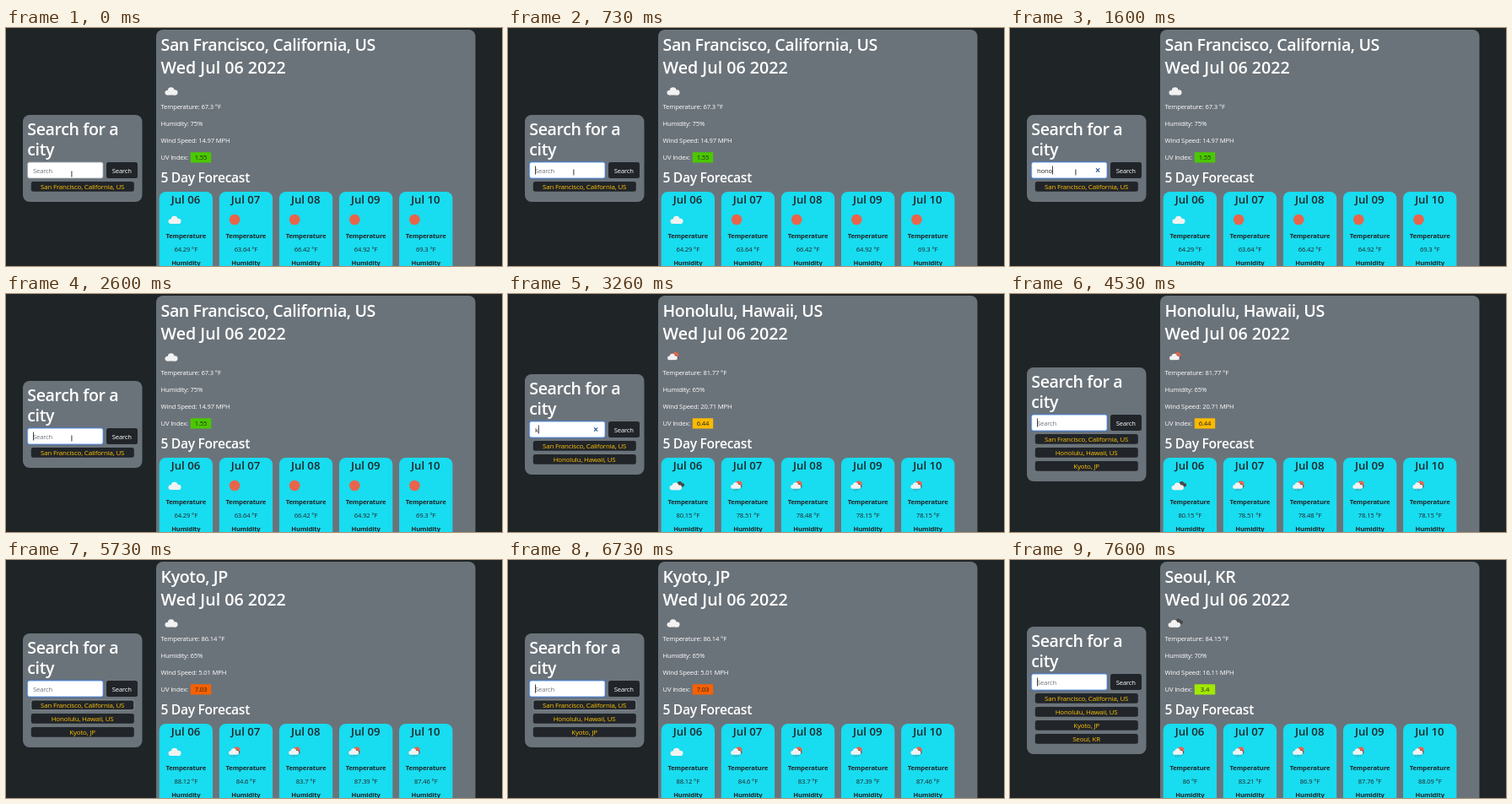
An HTML page for the animation above (8 s loop, 588x282 px).

```html
<!DOCTYPE html>
<html lang="en">
<head>
<meta charset="utf-8">
<title>Weather dashboard</title>
<style>
html, body { margin: 0; width: 588px; height: 282px; overflow: hidden; background: #1f2427; }
svg { display: block; }
text { font: 400 7.65px "Open Sans", "Noto Sans", sans-serif; letter-spacing: -.02em; white-space: pre; fill: #fff; }
.h1 { font-size: 19.6px; font-weight: 600; }
.date { font-size: 19.65px; font-weight: 600; letter-spacing: 0; }
.h2 { font-size: 15.65px; font-weight: 600; }
.day { font-size: 13.2px; font-weight: 600; letter-spacing: 0; }
.bold { font-weight: 700; }
.dark { fill: #212529; }
.mid { text-anchor: middle; }
.item { font-size: 7.95px; fill: #ffc107; }
.hint { fill: #6c757d; }
</style>
</head>
<body>
<svg id="stage" width="588" height="282" viewBox="0 0 588 282"></svg>
<script>
const LOOP = 8000, BLINK = 500;
const stage = document.getElementById('stage');

const cities = [
  { name: 'San Francisco, California, US', icon: 'cloud', temp: 67.3, hum: 75, wind: 14.97, uv: 1.55, color: '#4bc800',
    icons: ['cloud', 'sun'], days: [64.29, 63.64, 66.42, 64.92, 69.3] },
  { name: 'Honolulu, Hawaii, US', icon: 'rain', temp: 81.77, hum: 65, wind: 20.71, uv: 6.44, color: '#fcb900',
    icons: ['broken', 'rain'], days: [80.15, 78.51, 78.48, 78.15, 78.15] },
  { name: 'Kyoto, JP', icon: 'cloud', temp: 86.14, hum: 65, wind: 5.01, uv: 7.03, color: '#f86000',
    icons: ['cloud', 'rain'], days: [88.12, 84.6, 83.7, 87.39, 87.46] },
  { name: 'Seoul, KR', icon: 'broken', temp: 84.15, hum: 70, wind: 16.11, uv: 3.4, color: '#a2e800',
    icons: ['rain', 'rain'], days: [86, 83.21, 86.9, 87.76, 88.09] }
];

// Each step changes part of the page state; a step with `typed` restarts the caret.
const steps = [
  [0, { typed: '', list: 1, city: 0, focus: false, hover: false, beam: 173 }],
  [60, { beam: 171 }],
  [260, { typed: '', focus: true }],
  [1060, { typed: 'h' }], [1260, { typed: 'ho' }], [1400, { typed: 'hon' }], [1600, { typed: 'hono' }],
  [1800, { typed: 'honol' }], [2000, { typed: 'honolu' }], [2260, { typed: 'honolul' }], [2330, { typed: 'honolulu' }],
  [2600, { typed: '' }], [2860, { list: 2, beam: 0 }], [3000, { city: 1 }],
  [3260, { typed: 'k' }], [3460, { typed: 'ky' }], [3600, { typed: 'kyo' }], [4000, { typed: 'kyoto' }],
  [4130, { typed: '' }], [4460, { list: 3 }], [4600, { city: 2 }], [4960, { hover: true }],
  [6060, { typed: 's' }], [6200, { typed: 'se' }], [6260, { typed: 'seo' }], [6330, { typed: 'seou' }], [6400, { typed: 'seoul' }],
  [6600, { typed: '' }], [6860, { list: 4, hover: false }], [7000, { city: 3 }]
];

const text = (x, y, s, cls = '') => `<text x="${x}" y="${y}" class="${cls}">${s}</text>`;
const box = (x, y, w, h, r, fill, extra = '') =>
  `<rect x="${x}" y="${y}" width="${w}" height="${h}" rx="${r}" fill="${fill}" ${extra}/>`;
const dot = (x, y, r, fill) => `<circle cx="${x}" cy="${y}" r="${r}" fill="${fill}"/>`;
const line = (d, color, w) => `<path d="${d}" fill="none" stroke="${color}" stroke-width="${w}"/>`;
const cloud = (x, y, k, fill) => `<g transform="translate(${x} ${y}) scale(${k})">` +
  dot(-4.6, 1.6, 2.9, fill) + dot(-.3, -.8, 3.9, fill) + dot(4.4, 1.4, 3.1, fill) +
  box(-4.6, 0, 9, 4.5, 0, fill) + '</g>';

const icons = {
  cloud: cloud(0, 0, 1, '#f2f2f2'),
  sun: dot(0, -.5, 6.3, '#e8654b'),
  broken: cloud(3.8, -2.2, .7, '#484848') + cloud(-1.2, .5, .96, '#f2f2f2'),
  rain: dot(2.6, -2.4, 3.7, '#e8654b') + cloud(2.6, -.3, .5, '#6a4c4c') + cloud(-1, -.4, .8, '#f2f2f2') +
    line('M-3 3.4l-1 1.8M0 3.4l-1.3 2.7M2.6 3.4l-1 1.8', '#66666c', .7)
};
const icon = (x, y, kind) => `<g transform="translate(${x} ${y})">${icons[kind]}</g>`;

function weather(c) {
  let out = box(178, 2, 378.5, 300, 8, '#6b737a') +
    text(183.5, 26.7, c.name, 'h1') + text(183.5, 54.4, 'Wed Jul 06 2022', 'date') + icon(196, 75, c.icon) +
    text(183.5, 96, `Temperature: ${c.temp} °F`) + text(183.5, 116, `Humidity: ${c.hum}%`) +
    text(183.5, 136, `Wind Speed: ${c.wind} MPH`) + text(183.5, 156, 'UV Index:') +
    box(218.8, 147.2, 24.4, 12.3, .6, c.color) + text(231, 156.3, c.uv, 'dark mid') +
    text(183.5, 182.7, '5 Day Forecast', 'h2');
  c.days.forEach((t, i) => {
    const x = 181.7 + i * 71.1, mid = x + 31.6;
    out += box(x, 194, 63.3, 100, 8, '#18dcef') +
      text(mid - .3, 208, 'Jul ' + String(6 + i).padStart(2, '0'), 'day dark mid') +
      icon(x + 18.3, 227.5, c.icons[Math.min(i, 1)]) +
      text(mid, 248.8, 'Temperature', 'bold dark mid') + text(mid, 264.8, t + ' °F', 'dark mid') +
      text(mid, 280.8, 'Humidity', 'bold dark mid');
  });
  return out;
}

function search(s) {
  const y = 111 - 8 * s.list;
  let out = box(20, y, 141.5, 87 + 16 * s.list, 8, '#6b737a') +
    text(25.3, y + 24.3, 'Search for a', 'h1') + text(25.3, y + 48.3, 'city', 'h1');
  if (s.focus) out += box(24.3, y + 54.8, 92, 21.4, 3.5, '#0d6efd', 'fill-opacity=".3"');
  out += box(25.8, y + 56.2, 89, 18.6, 2, '#fff', `stroke="${s.focus ? '#86b7fe' : '#ced4da'}" stroke-width=".6"`);
  out += s.typed
    ? text(32, y + 68.7, s.typed, 'dark typed') + line(`M102 ${y + 63.4}l4.2 4.2m0-4.2l-4.2 4.2`, '#1f4f86', 1.1)
    : text(32, y + 68.7, 'Search', 'hint');
  out += `<path id="caret" d="M32.5 ${y + 60.5}v10" stroke="#111" stroke-width=".8" visibility="hidden"/>` +
    box(119, y + 56, 37, 19, 2.5, '#212529') + text(137.3, y + 68.7, 'Search', 'mid');
  for (let i = 0; i < s.list; i++) {
    const top = y + 79 + 16 * i;
    const edge = s.hover && i === 0 ? 'stroke="#a9afb5" stroke-width=".7"' : '';
    out += box(29.8, top, 122, 11.8, 2.5, '#212529', edge) + text(90.6, top + 9, cities[i].name, 'item mid');
  }
  if (s.beam) out += line(`M77.9 ${s.beam - 3.5}v7`, '#333', 1);
  return out;
}

function stateAt(t) {
  const s = { since: 0 };
  for (const [at, change] of steps) {
    if (at > t) break;
    Object.assign(s, change);
    if ('typed' in change) s.since = at;
  }
  return s;
}

let shown = '';
function draw(t) {
  const s = stateAt(t), key = JSON.stringify(s);
  if (key !== shown) {
    shown = key;
    stage.innerHTML = weather(cities[s.city]) + search(s);
    const typed = stage.querySelector('.typed');
    if (typed) document.getElementById('caret').setAttribute('transform', `translate(${typed.getComputedTextLength()} 0)`);
  }
  const on = s.focus && (t - s.since) % (2 * BLINK) < BLINK;
  document.getElementById('caret').setAttribute('visibility', on ? 'visible' : 'hidden');
}

const start = performance.now();
function tick() {
  draw((performance.now() - start) % LOOP);
  requestAnimationFrame(tick);
}
tick();
</script>
</body>
</html>
```
